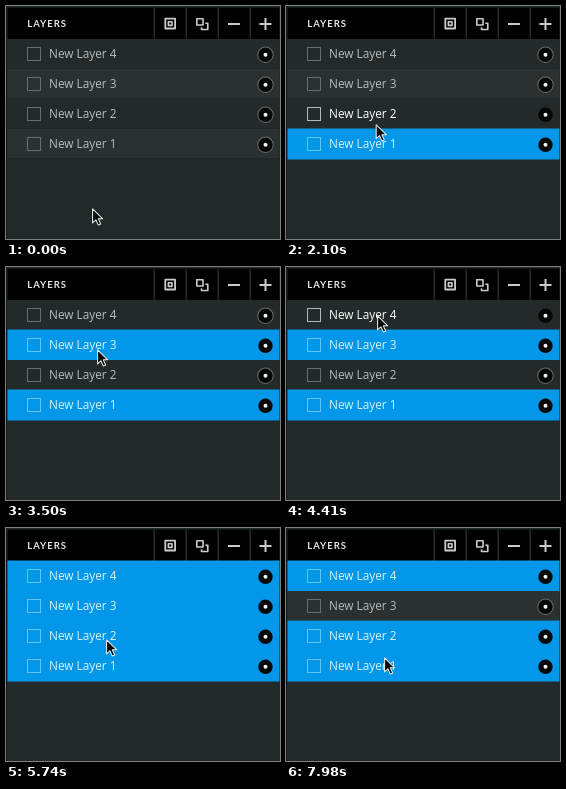
These frames come from a looping animation (274x233 px, 8000 ms). An HTML page with a canvas:

```html
<!DOCTYPE html>
<html lang="en">
<head>
<meta charset="utf-8">
<title>Layers panel</title>
<style>
  html, body { margin: 0; width: 100%; height: 100%; overflow: hidden; background: #222929; }
  canvas { display: block; width: 274px; height: 233px; }
</style>
</head>
<body>
<canvas></canvas>
<script>
const WIDTH = 274, HEIGHT = 233, LOOP = 8000;
const ROW_TOP = 33, ROW_HEIGHT = 30;
const EDGE = 1.5, PANEL_WIDTH = 272;
const BLUE = '#0297e8';

const canvas = document.querySelector('canvas');
const ctx = canvas.getContext('2d');
const scale = window.devicePixelRatio || 1;
canvas.width = WIDTH * scale;
canvas.height = HEIGHT * scale;

// Each layer is highlighted from one moment to another.
const layers = [
  { name: 'New Layer 4', from: 4550, to: LOOP, fill: '#242a2a' },
  { name: 'New Layer 3', from: 3290, to: 7200, fill: '#2b3131' },
  { name: 'New Layer 2', from: 5640, to: LOOP, fill: '#242a2a' },
  { name: 'New Layer 1', from: 1470, to: LOOP, fill: '#2b3131' },
];
const press = { row: 1, from: 7110, to: 7200 };

// Pointer stops: time, x, y
const stops = [
  [0, 86, 202], [490, 86, 202], [1150, 89, 132], [1750, 89, 132],
  [2750, 91, 82], [3860, 91, 82], [4350, 91, 48], [4700, 91, 48],
  [5500, 100, 111], [6250, 100, 111], [6950, 98, 76], [7250, 98, 76],
  [7900, 98, 129], [LOOP, 98, 129],
];

const smooth = p => p * p * (3 - 2 * p);

function pointerAt(t) {
  const i = stops.findIndex(stop => stop[0] > t);
  const [t0, x0, y0] = stops[i - 1], [t1, x1, y1] = stops[i];
  const p = smooth((t - t0) / (t1 - t0));
  return { x: x0 + (x1 - x0) * p, y: y0 + (y1 - y0) * p };
}

function box(x, y, w, h, color) {
  ctx.fillStyle = color;
  ctx.fillRect(x, y, w, h);
}

function frame(x, y, size, color, line) {
  ctx.strokeStyle = color;
  ctx.lineWidth = line;
  ctx.strokeRect(x, y, size, size);
}

function disc(x, y, r, color) {
  ctx.fillStyle = color;
  ctx.beginPath();
  ctx.arc(x, y, r, 0, Math.PI * 2);
  ctx.fill();
}

function text(label, x, y, font, color, spacing = '0px') {
  ctx.font = font;
  ctx.letterSpacing = spacing;
  ctx.fillStyle = color;
  ctx.fillText(label, x, y);
}

function drawHeader() {
  const icon = '#c9cccc';
  box(EDGE, EDGE, PANEL_WIDTH, ROW_TOP - EDGE, '#000');
  text('LAYERS', 21.3, 21.3, 'bold 9.5px Lato, sans-serif', '#e4e6e6', '1px');
  for (let x = 147.5; x < WIDTH; x += 32) box(x, EDGE, 1.3, ROW_TOP - EDGE, '#2b3131');

  ctx.lineJoin = 'round';
  frame(159.3, 12.7, 9.8, icon, 1.8);
  frame(162.4, 15.8, 3.6, icon, 1.6);

  // The upper square covers a corner of the lower one.
  frame(195.5, 17.2, 6.3, icon, 1.6);
  box(189, 11, 10.3, 10.3, '#000');
  frame(190.8, 12.8, 6.2, icon, 1.6);

  box(222, 17, 12, 2, icon);
  box(253.5, 17, 12, 2, icon);
  box(258.5, 12, 2, 12, icon);
}

function drawLayer(layer, row, t, hovered) {
  const top = ROW_TOP + row * ROW_HEIGHT;
  const selected = t >= layer.from && t < layer.to;
  const pressed = row === press.row && t >= press.from && t < press.to;
  // The first hover brightens only the label.
  const active = hovered && t > 1400;

  if (selected) {
    box(EDGE, top - 0.5, PANEL_WIDTH, ROW_HEIGHT + 1, BLUE);
  } else {
    box(EDGE, top, PANEL_WIDTH, ROW_HEIGHT, layer.fill);
    box(EDGE, top + ROW_HEIGHT - 1, PANEL_WIDTH, 1, '#1f2525');
  }

  const outline = pressed ? '#25617f' : selected ? '#65c3ef' : active ? '#b4b8b8' : '#686e6e';
  ctx.lineJoin = 'miter';
  frame(21.5, top + 8.5, 13, outline, 1);

  const label = selected ? '#d9f4fb' : hovered ? '#fff' : '#b9bcbc';
  text(layer.name, 43, top + 19.3, '500 11.8px "Open Sans", sans-serif', label);

  const y = top + 15.8;
  if (!selected && !active) disc(259.5, y, 8.2, '#686e6e');
  disc(259.5, y, 7.2, pressed ? '#15303b' : '#050707');
  disc(259.5, y, 2, '#f2f4f4');
}

const arrow = new Path2D('M0 0V15.2L3.6 11.8L6.2 17.6L8.8 16.4L6.2 10.8H11Z');

function drawPointer({ x, y }) {
  ctx.save();
  ctx.translate(x + 0.6, y + 0.9);
  ctx.scale(0.92, 0.92);
  ctx.lineJoin = 'round';
  ctx.fillStyle = '#080a0a';
  ctx.fill(arrow);
  ctx.strokeStyle = '#eceeee';
  ctx.lineWidth = 1.1;
  ctx.stroke(arrow);
  ctx.restore();
}

function draw(now) {
  const t = now % LOOP;
  const pointer = pointerAt(t);
  const hoverRow = Math.floor((pointer.y - ROW_TOP) / ROW_HEIGHT);

  ctx.setTransform(scale, 0, 0, scale, 0, 0);
  box(0, 0, WIDTH, HEIGHT, '#222929');
  box(0, 0, 1, HEIGHT, '#151a1a');
  drawHeader();
  layers.forEach((layer, row) => drawLayer(layer, row, t, row === hoverRow));
  drawPointer(pointer);
  requestAnimationFrame(draw);
}

draw(0);
</script>
</body>
</html>
```
